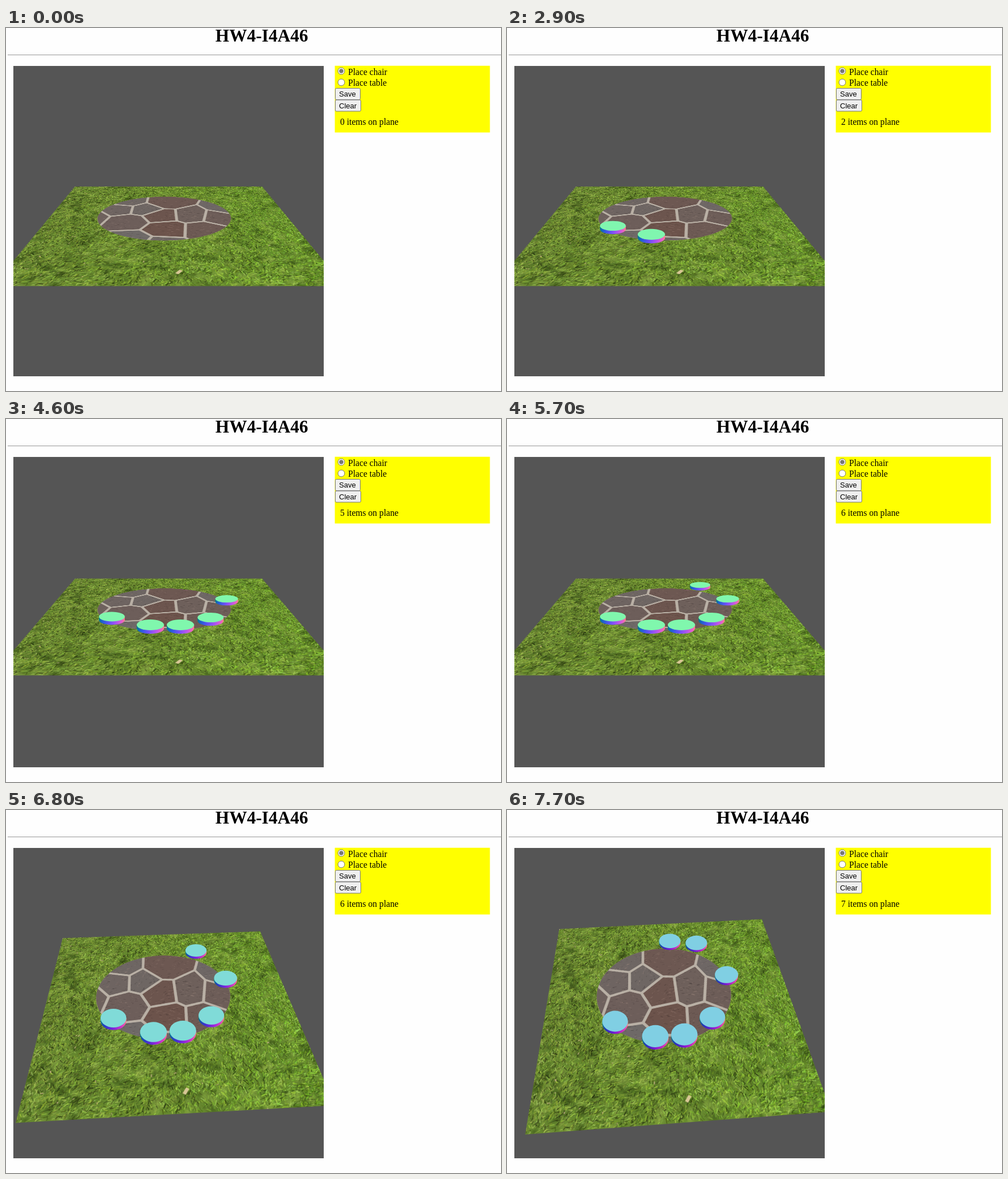
Recreate the animation shown at these times as an HTML page with a canvas. Size 874x641 px, loop 8000 ms.

```html
<!DOCTYPE html>
<html lang="en">
<head>
<meta charset="utf-8">
<title>HW4-I4A46</title>
<style>
  html, body { margin: 0; width: 100%; height: 100%; overflow: hidden; background: #fefefe; }
  #view { position: absolute; left: 13px; top: 67px; width: 548px; height: 548px; overflow: hidden; background: #555; }
  #ground { position: absolute; left: 18px; top: 18px; }
  svg { position: absolute; left: 0; top: 0; }
  text { font: 15.65px "Liberation Serif", "Times New Roman", serif; }
  .title { font-size: 31.3px; font-weight: bold; text-anchor: middle; }
  .label { font: 13.04px "Liberation Sans", Arial, sans-serif; }
  .button { fill: #efefef; stroke: #767676; }
</style>
</head>
<body>
<div id="view"><canvas id="ground" width="512" height="512"></canvas></div>
<svg width="874" height="641" viewBox="0 0 874 641">
  <defs><linearGradient id="side"></linearGradient></defs>
  <text class="title" x="451.6" y="24.3">HW4-I4A46</text>
  <rect x="3" y="47" width="871" height="1" fill="#969696"/>
  <rect x="580.6" y="66.7" width="273.8" height="117.8" fill="#ff0"/>
  <circle id="ring" cx="592" cy="76" r="5.9" fill="#fff"/>
  <circle id="dot" cx="592" cy="76" r="3.8"/>
  <circle cx="592" cy="96" r="5.9" fill="#fff" stroke="#767676"/>
  <text x="604" y="83">Place chair</text>
  <text x="604" y="102">Place table</text>
  <rect class="button" x="581.5" y="106.5" width="44" height="20" rx="2"/>
  <rect class="button" x="581.5" y="127" width="45" height="20" rx="2"/>
  <text class="label" x="588" y="121">Save</text>
  <text class="label" x="588" y="141.5">Clear</text>
  <text id="count" x="590" y="171"></text>
  <g id="chairs"></g>
</svg>
<script>
const LOOP = 8000, STEP = 100;
const N = 512;                      // texture size; the ground spans -1..1
const CX = 287, CY = 341;           // centre of the view
const FOCAL = 656, DIST = 3.04;     // camera
const RADIUS = .1, HEIGHT = .028;   // chair

// Start time and place on the ground
const CHAIRS = [
  [2300, -.438, .17], [2900, -.133, .333], [3400, .087, .333], [3900, .323, .188],
  [4500, .511, -.253], [5700, .301, -.673], [7700, .057, -.718]
];
// Cell centre and warmth of each paving stone
const STONES = [
  [-.025, -.481, 14], [-.381, -.494, 5], [-.429, -.29, 6], [-.219, -.288, 5], [-.683, -.088, 8],
  [-.334, 0, 10], [-.062, -.121, 16], [.192, -.127, 9], [.539, -.318, 4], [.422, -.085, 11],
  [-.011, .15, 18], [.272, .166, 13], [-.294, .383, 3], [-.044, .476, 5]
];
const PATIO = { x: -.036, z: -.134, rx: .562, rz: .515 };

const $ = id => document.getElementById(id);
const clamp = v => Math.max(0, Math.min(1, v));

let seed = 46;
function rand(lo = 0, hi = 1) {
  seed = seed + 0x6D2B79F5 | 0;
  let r = Math.imul(seed ^ seed >>> 15, 1 | seed);
  r = r + Math.imul(r ^ r >>> 7, 61 | r) ^ r;
  return lo + (hi - lo) * ((r ^ r >>> 14) >>> 0) / 4294967296;
}

const c = $('ground').getContext('2d');
const px = v => (v + 1) * N / 2;

function spot(x, y, r, rgb, alpha) {
  const g = c.createRadialGradient(x, y, 0, x, y, r);
  g.addColorStop(0, `rgba(${rgb},${alpha})`);
  g.addColorStop(1, `rgba(${rgb},0)`);
  c.fillStyle = g;
  c.fillRect(x - r, y - r, 2 * r, 2 * r);
}

function dash(x, y, len, angle, width, color) {
  c.strokeStyle = color;
  c.lineWidth = width;
  c.beginPath();
  c.moveTo(x, y);
  c.lineTo(x + len * Math.cos(angle), y + len * Math.sin(angle));
  c.stroke();
}

function blades(count) {
  for (let i = 0; i < count; i++) {
    const x = rand(0, N), y = rand(0, N), right = x / N - .5;
    const patch = Math.sin(x * .031 + 2 * Math.sin(y * .023)) * Math.sin(y * .037 + x * .011);
    const angle = -1.1 + .6 * Math.sin(x * .017 + y * .012) + rand(-1, 1);
    dash(x, y, rand(3, 10), angle, rand(.7, 1.6),
      `hsl(${rand(74, 87) + 8 * right},${rand(44, 62) + 14 * right}%,${rand(15, 58) + 4 * patch + 4 * right}%)`);
  }
}

function drawGrass() {
  c.fillStyle = '#66882f';
  c.fillRect(0, 0, N, N);
  blades(20000);
  for (let i = 0; i < 700; i++)
    spot(rand(0, N), rand(0, N), rand(4, 17), i % 2 ? '32,52,10' : '165,190,85', .38);
  blades(6000);
  for (let i = 0; i < 70; i++)        // dry stems, mostly at the left
    dash(N * rand() ** 1.8, rand(0, N), rand(2, 6), rand(-2, 0), rand(1, 2.5), '#b5a679');
  dash(px(.05), px(.86), 13, -1, 6, '#d8c795');
}

// Voronoi cell of one stone, shrunk by half a joint
function cell(stone) {
  let poly = [[-2, -2], [2, -2], [2, 2], [-2, 2]];
  for (const other of STONES) {
    if (other === stone) continue;
    const dx = other[0] - stone[0], dz = other[1] - stone[1], len = Math.hypot(dx, dz);
    const over = p => ((p[0] - stone[0]) * dx + (p[1] - stone[1]) * dz) / len - len / 2 + .012;
    poly = poly.flatMap((p, i) => {
      const q = poly[(i + 1) % poly.length], a = over(p), b = over(q), k = a / (a - b);
      const kept = a <= 0 ? [p] : [];
      if (a * b < 0) kept.push([p[0] + k * (q[0] - p[0]), p[1] + k * (q[1] - p[1])]);
      return kept;
    });
  }
  return poly;
}

function drawPatio() {
  const { x, z, rx, rz } = PATIO;
  c.save();
  c.beginPath();
  c.ellipse(px(x), px(z), rx * N / 2, rz * N / 2, 0, 0, 7);
  c.clip();
  c.fillStyle = '#b9b0a5';
  c.fillRect(0, 0, N, N);
  for (const stone of STONES) {
    c.save();
    c.beginPath();
    for (const [u, v] of cell(stone)) c.lineTo(px(u), px(v));
    c.closePath();
    c.fillStyle = `hsl(14,${stone[2]}%,${43 - .4 * stone[2]}%)`;
    c.fill();
    c.clip();
    const grain = rand(-1.2, .4);
    for (let i = 0; i < 420; i++)
      dash(px(stone[0] + rand(-.3, .3)), px(stone[1] + rand(-.3, .3)), rand(1, 8), grain + rand(-.4, .4),
        rand(.8, 2), `rgba(${i % 2 ? '40,32,32' : '185,158,145'},${rand(.08, .3)})`);
    c.restore();
  }
  c.restore();
}

// Elevation and turn of the camera: a small nudge, then one drag
function camera(t) {
  const nudge = clamp((t - 4400) / 200);
  const drag = Math.sin(clamp((t - 6600) / 340) * Math.PI / 2);
  return { tilt: .378 - .011 * nudge + .53 * drag ** 1.25, turn: .076 * drag };
}

function add(parent, name) {
  return parent.appendChild(document.createElementNS('http://www.w3.org/2000/svg', name));
}

function set(el, attrs) {
  for (const k in attrs) el.setAttribute(k, attrs[k]);
}

const stops = Array.from({ length: 13 }, (_, i) => {
  const el = add($('side'), 'stop');
  set(el, { offset: i / 12 });
  return { el, nx: i / 6 - 1 };
});
const chairs = CHAIRS.map(([start, x, z]) => {
  const g = add($('chairs'), 'g'), side = add(g, 'path'), top = add(g, 'ellipse');
  set(side, { fill: 'url(#side)' });
  return { start, x, z, g, side, top };
});

// Colour of a surface by its normal in view space
const normalColor = (...n) => `rgb(${n.map(v => Math.round(127.5 + 127.5 * v))})`;

function drawChair({ start, x, z, g, side, top }, t, { tilt, turn }) {
  const sin = Math.sin(tilt), cos = Math.cos(tilt);
  const across = x * Math.cos(turn) + z * Math.sin(turn);
  const near = z * Math.cos(turn) - x * Math.sin(turn);
  const scale = FOCAL / (DIST - near * cos - HEIGHT * sin);
  const dy = (near * sin - HEIGHT * cos) * scale;
  const cx = CX + across * scale, cy = CY + dy;
  const rx = RADIUS * scale, ry = rx * (sin + cos * dy / FOCAL), h = HEIGHT * cos * scale;
  set(g, { visibility: t >= start ? 'visible' : 'hidden' });
  set(side, { d: `M${cx - rx} ${cy}v${h}A${rx} ${ry} 0 0 0 ${cx + rx} ${cy + h}v${-h}z` });
  set(top, { cx, cy, rx, ry, fill: normalColor(0, cos, sin) });
}

// The pointer hovers over the radio button, then presses it
function radioColor(t) {
  if (t < 1000 || t >= 1400) return '#767676';
  return t < 1200 ? '#4f4f4f' : '#8d8d8d';
}

function render(time) {
  const t = Math.floor(time / STEP) * STEP;
  const cam = camera(t), sin = Math.sin(cam.tilt), cos = Math.cos(cam.tilt);
  $('ground').style.transform = `perspective(${FOCAL}px) rotateX(${Math.PI / 2 - cam.tilt}rad) ` +
    `rotateZ(${-cam.turn}rad) scale(${2 * FOCAL / DIST / N})`;
  for (const { el, nx } of stops) {
    const nz = Math.sqrt(1 - nx * nx);
    set(el, { 'stop-color': normalColor(nx, -sin * nz, cos * nz) });
  }
  chairs.forEach(chair => drawChair(chair, t, cam));
  $('count').textContent = `${chairs.filter(chair => chair.start <= t).length} items on plane`;
  set($('ring'), { stroke: radioColor(t) });
  set($('dot'), { fill: radioColor(t) });
}

drawGrass();
drawPatio();
const begin = performance.now();
function tick() {
  render((performance.now() - begin) % LOOP);
  requestAnimationFrame(tick);
}
tick();
</script>
</body>
</html>
```
